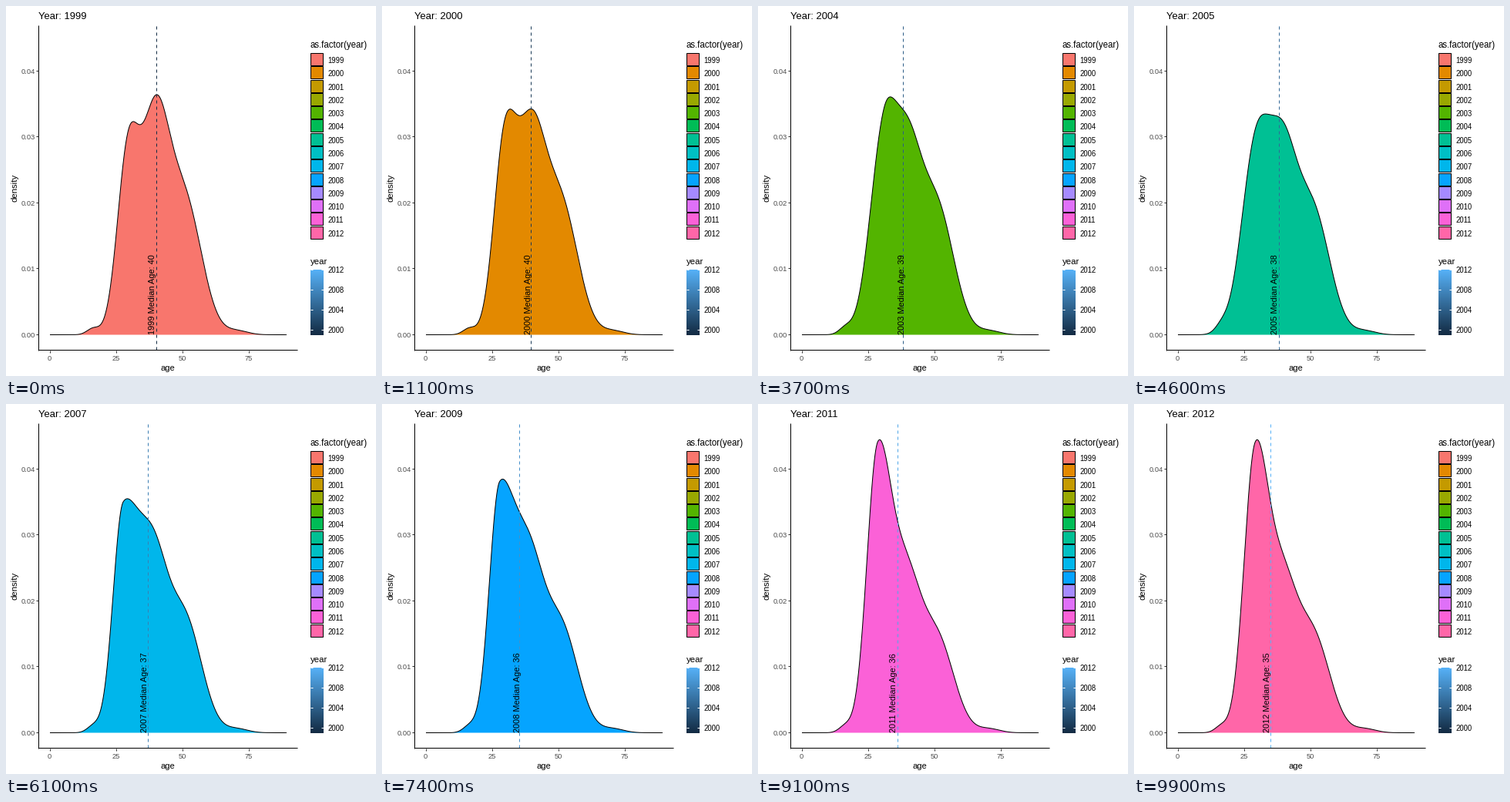
A matplotlib script for the animation above (10 s loop, 480 px wide and 480 px high).

```python
import numpy as np
import matplotlib.pyplot as plt
from matplotlib.animation import FuncAnimation
from matplotlib.patches import Polygon, Rectangle

SIZE, DPI = 480, 80
PT = 72 / DPI  # points per pixel
FRAMES, STEP = 100, 100
FIRST, LAST = 1999, 2012
SPAN = LAST - FIRST
YEARS = range(FIRST, LAST + 1)

plt.rcParams["font.family"] = "Liberation Sans"

MEDIANS = [40, 40, 39, 39, 39, 38, 38, 38, 37, 36, 35, 35, 36, 35]
KEYS = np.round(np.arange(SPAN + 1) * (FRAMES - 1) / SPAN)

# Young peak (centre, left and right spread, height), then the heights
# of the middle and old groups; the years between are blended.
SHAPES = {
    1999: (158, 14, 14, 222, 265, 170),
    2001: (160, 14.5, 16, 253, 215, 165),
    2003: (162, 17.5, 16, 238, 215, 163),
    2005: (158, 18.5, 18.5, 238, 205, 158),
    2007: (152, 13.3, 24, 287, 165, 145),
    2010: (153.5, 13.8, 19, 363, 170, 118),
    2012: (157, 14.5, 17.5, 354, 165, 125),
}
BASE = 426.5
XS = np.linspace(57, 364, 615)


def bell(centre, spread):
    return np.exp(-((XS - centre) / spread) ** 2 / 2)


def density(year):
    centre, left, right, young, middle, old = (
        np.interp(year, list(SHAPES), col) for col in zip(*SHAPES.values()))
    return (young * bell(centre, np.where(XS < centre, left, right))
            + middle * bell(193, 18) + old * bell(232, 22)
            + 8 * bell(113, 8) + 5 * bell(300, 14))


def hue_color(hue, chroma=100, light=65):
    """sRGB colour of a polar LUV hue, as in evenly spaced palettes."""
    a = np.radians(hue)
    u = chroma * np.cos(a) / (13 * light) + 0.1978
    v = chroma * np.sin(a) / (13 * light) + 0.4683
    y = ((light + 16) / 116) ** 3
    x = 9 * y * u / (4 * v)
    z = 3 * y / v - 5 * y - x / 3
    lin = np.array([3.2405 * x - 1.5372 * y - 0.4985 * z,
                    -0.9693 * x + 1.8760 * y + 0.0416 * z,
                    0.0556 * x - 0.2040 * y + 1.0573 * z])
    lin = np.clip(lin, 0, 1)
    return np.where(lin > 0.0031308, 1.055 * lin ** (1 / 2.4) - 0.055,
                    12.92 * lin)


def year_color(u):
    dark, light = np.array([19, 43, 67]), np.array([86, 177, 247])
    return (dark + (light - dark) * u) / 255


def age_x(age):
    return 57 + 3.44 * age


CURVES = [density(y) for y in YEARS]
FILLS = [hue_color(15 + 360 * i / len(YEARS)) for i in range(len(YEARS))]
COLUMNS = np.round(age_x(np.interp(np.arange(FRAMES), KEYS, MEDIANS)))

fig = plt.figure(figsize=(SIZE / DPI, SIZE / DPI), dpi=DPI, facecolor="white")
ax = fig.add_axes([0, 0, 1, 1])
ax.axis("off")


def text(x, y, s, px, color="black", ha="left", rot=0):
    return ax.text(x, y, s, fontsize=px * PT, color=color, ha=ha,
                   va="baseline", rotation=rot, rotation_mode="anchor")


def line(x, y, color="black", **kw):
    """One-pixel line; straight ones snap to the pixel they name."""
    return ax.plot(x, y, color=color, lw=PT, solid_capstyle="butt", **kw)[0]


# Density, median line and its label
area = ax.add_patch(Polygon([(0, 0), (1, 1), (1, 0)], lw=0))
edge = line([], [])
rule = line([], [], dashes=(4, 4))
label = text(0, BASE, "", 11, rot=90)

# Axes
line([42, 42], [25, 447])
line([42, 378], [446, 446])
for i in range(5):
    y = int(BASE - 85.6 * i)
    line([39, 42], [y, y], "#333333")
    text(37.5, y + 4, f"0.0{i}", 9.4, "#4D4D4D", "right")
for age in (0, 25, 50, 75):
    x = round(age_x(age))
    line([x, x], [447, 450], "#333333")
    text(x - 0.5, 460, str(age), 9.4, "#4D4D4D", "center")
text(210, 473, "age", 11.2, ha="center")
text(14.5, 236, "density", 11.4, ha="center", rot=90)
title = text(42, 17, "", 13)

# Colour keys
text(394.5, 54, "as.factor(year)", 11.5)
for i, year in enumerate(YEARS):
    y = round(61 + 17.28 * i)
    ax.add_patch(Rectangle((395, y), 16, 16, fc=FILLS[i], ec="black", lw=PT))
    text(417, y + 13, str(year), 9.5)

# Colour bar
text(394.5, 335, "year", 11.4)
bar = year_color(np.linspace(1, 0, 85)[:, None])[:, None, :]
ax.imshow(bar, extent=(395, 412, 427, 342), aspect="auto",
          interpolation="nearest")
for year in range(2000, LAST + 1, 4):
    y = round(426.5 - 84.5 * (year - FIRST) / SPAN)
    for x in (395, 409):
        line([x, x + 3], [y, y], "white")
    text(417, y + 4, str(year), 9.5)

ax.set_xlim(0, SIZE)
ax.set_ylim(SIZE, 0)


def draw(n):
    i = int(np.searchsorted(KEYS, n, side="right")) - 1
    u = n / (FRAMES - 1)
    top = BASE - CURVES[i]
    area.set_xy([(XS[0], BASE), *zip(XS, top), (XS[-1], BASE)])
    area.set_facecolor(FILLS[i])
    edge.set_data(XS, top)

    rule.set_data([COLUMNS[n]] * 2, [446, 25])
    rule.set_color(year_color(u))

    label.set_x(age_x(MEDIANS[i]) - 1.6)
    label.set_text(f"{YEARS[i]} Median Age: {MEDIANS[i]}")
    title.set_text(f"Year: {round(FIRST + SPAN * u)}")
    return area, edge, rule, label, title


anim = FuncAnimation(fig, draw, frames=FRAMES, interval=STEP, repeat=True,
                     repeat_delay=0, blit=False)
plt.show()
```
